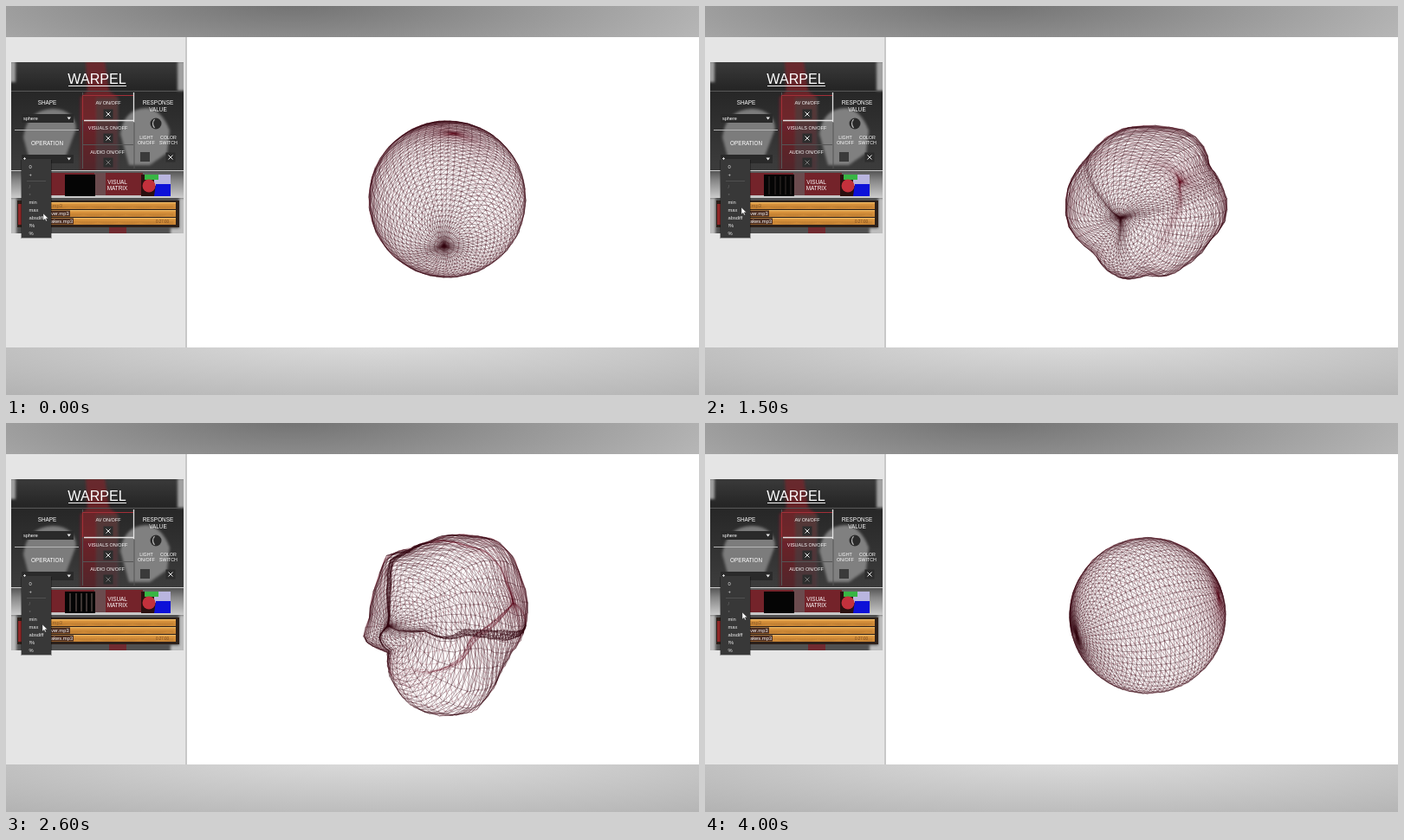
Write an HTML page with a canvas that moves like this. It is 800x450 px and loops after 4100 ms.

```html
<!DOCTYPE html>
<html lang="en">
<head>
<meta charset="utf-8">
<title>Mesh visualiser</title>
<style>
html, body { margin: 0; width: 100%; height: 100%; overflow: hidden; background: #fff; }
#stage { position: relative; width: 800px; height: 450px; overflow: hidden; }
svg, canvas { position: absolute; left: 0; top: 0; display: block; }
text { font-family: "Liberation Sans", Arial, sans-serif; fill: #fff; }
.mid { text-anchor: middle; }
</style>
</head>
<body>
<div id="stage">
<svg id="ui" width="800" height="450" viewBox="0 0 800 450">
  <defs>
    <radialGradient id="top" gradientUnits="userSpaceOnUse" cx="0" cy="0" r="1" gradientTransform="translate(330 -6) scale(520 110)">
      <stop offset="0" stop-color="#707070"/><stop offset="1" stop-color="#b8b8b8"/>
    </radialGradient>
    <radialGradient id="low" gradientUnits="userSpaceOnUse" cx="0" cy="0" r="1" gradientTransform="translate(430 385) scale(720 95)">
      <stop offset="0" stop-color="#dedede"/><stop offset="1" stop-color="#aeaeae"/>
    </radialGradient>
    <linearGradient id="skin" x2="0" y2="1">
      <stop offset="0" stop-color="#3a3a3a"/><stop offset=".15" stop-color="#262626"/>
      <stop offset=".6" stop-color="#3b3b3b"/><stop offset="1" stop-color="#333"/>
    </linearGradient>
    <linearGradient id="steel" x2="0" y2="1">
      <stop offset="0" stop-color="#555"/><stop offset=".35" stop-color="#858585"/><stop offset="1" stop-color="#c8c8c8"/>
    </linearGradient>
    <linearGradient id="robe" x2="0" y2="1">
      <stop offset="0" stop-color="#7c2228"/><stop offset=".5" stop-color="#8a1f28"/><stop offset="1" stop-color="#5a1a1f"/>
    </linearGradient>
    <linearGradient id="amber" x2="0" y2="1">
      <stop offset="0" stop-color="#f4c470"/><stop offset=".25" stop-color="#d8923c"/><stop offset="1" stop-color="#c88434"/>
    </linearGradient>
    <filter id="soft" x="-20%" y="-20%" width="140%" height="140%"><feGaussianBlur stdDeviation="1.6"/></filter>
    <clipPath id="face"><rect x="6" y="65" width="199" height="198"/></clipPath>
  </defs>

  <rect width="800" height="36" fill="url(#top)"/>
  <rect y="395" width="800" height="55" fill="url(#low)"/>
  <rect y="36" width="208" height="359" fill="#e5e5e5"/>
  <rect x="207" y="36" width="2" height="359" fill="#c9c9c9"/>
  <rect x="209" y="36" width="591" height="359" fill="#fff"/>

  <g clip-path="url(#face)">
    <rect x="6" y="65" width="199" height="198" fill="url(#skin)"/>
    <g filter="url(#soft)">
      <path d="M92 64h22l5 34 10 8v86H86v-86l8-8z" fill="url(#robe)" opacity=".7"/>
      <path d="M104 106h26v86h-26z" fill="#444" opacity=".6"/>
      <path d="M20 152q4-32 34-33 26 1 27 23l-12 32H26z" fill="#7c7c7c"/>
      <path d="M132 148q4-29 30-30 18 2 27 26l-3 26-20 14h-24z" fill="#808080"/>
      <path d="M4 64h7v24H4zM198 64h10v34h-10z" fill="#a0a0a0"/>
    </g>
    <rect x="6" y="191" width="199" height="30" fill="url(#steel)"/>
    <rect x="50" y="193" width="108" height="26" fill="#74232a"/>
    <rect x="102" y="193" width="13" height="26" fill="#666" opacity=".6"/>
    <rect x="6" y="222" width="199" height="41" fill="#505050"/>
    <g filter="url(#soft)">
      <path d="M4 222h8v44H4zM200 222h8v44h-8zM190 257h14v8h-14z" fill="#bdbdbd"/>
    </g>
    <rect x="119" y="255" width="20" height="8" fill="#702a30"/>
    <path d="M6 98.500h199" stroke="#585858"/>
    <path d="M88.500 100v88M89 160.500h58M148 135v53" stroke="#555"/>
    <path d="M147 103.500H88.500V132" fill="none" stroke="#a32f38"/>
    <path d="M90 132.500h58M147.500 100v34" stroke="#e4e4e4" stroke-width="1.300"/>
    <path d="M10 143.500h74" stroke="#b5b5b5"/>
    <path d="M6 190.500h199M6 221.500h199" stroke="#ccc"/>
  </g>

  <g fill="#2a2a2a">
    <rect x="18" y="125" width="60" height="10"/>
    <rect x="18" y="172" width="60" height="10"/>
    <rect x="155" y="169" width="11" height="11" fill="#3a3a3a"/>
    <path d="M70.500 128.500h4.500l-2.250 3zM70.500 175.500h4.500l-2.250 3z" fill="#eee"/>
    <circle cx="173" cy="136" r="6.500"/>
    <path d="M171.500 131q-4 5 0 10" fill="none" stroke="#bbb" stroke-width="1.200"/>
  </g>
  <g id="checks"></g>
  <g id="labels"></g>
  <path d="M72 92.500h67" stroke="#f4f4f4"/>

  <rect x="68" y="195" width="35" height="25" fill="#050505"/>
  <path id="bars" d="M74 197v21M81 197v21M87 197v21M93 197v21M99 197v21" stroke="#4c403e" stroke-width="2"/>
  <g>
    <rect x="156" y="195" width="34" height="25" fill="#2a1010"/>
    <rect x="171" y="195" width="19" height="13" fill="#b9b5df"/>
    <rect x="160" y="195" width="16" height="6" fill="#38b544"/>
    <path d="M173 206h17v14h-19z" fill="#0d10d8"/>
    <circle cx="165" cy="208" r="7.500" fill="#c3313c"/>
  </g>

  <rect x="13" y="225" width="187" height="31" fill="#2c201a"/>
  <rect x="14" y="229" width="5" height="24" fill="#8e2828"/>
  <g id="tracks"></g>
  <rect x="17" y="178" width="36" height="91" fill="#000" opacity=".3"/>
  <rect x="18" y="177" width="34" height="91" fill="#383838"/>
  <path d="M24 202.500h22" stroke="#505050"/>
  <path d="M20 176.500h3M21.500 175v3" stroke="#eee" stroke-width=".8"/>
  <g id="menu"></g>
  <path id="cursor" d="M0 0v8l2-1.700 1.200 2.600 1.200-.6-1.200-2.500h2.600z" fill="#fff" stroke="#222" stroke-width=".4"/>
</svg>
<canvas id="mesh" width="800" height="450"></canvas>
</div>
<script>
const LOOP = 4100, STEP = 100, TAU = Math.PI * 2;
const $ = id => document.getElementById(id);
const NS = "http://www.w3.org/2000/svg";

function add(parent, tag, attrs, text) {
  const el = document.createElementNS(NS, tag);
  for (const k in attrs) el.setAttribute(k, attrs[k]);
  if (text) el.textContent = text;
  return $(parent).appendChild(el);
}

[
  ["WARPEL", 105, 89.5, 16.1], ["SHAPE", 47.5, 114.3, 6.4], ["OPERATION", 47.5, 161.3, 6.4],
  ["AV ON/OFF", 118, 113.5, 5.5], ["VISUALS ON/OFF", 117.5, 143, 5.5], ["AUDIO ON/OFF", 117, 170.5, 5.5],
  ["RESPONSE", 175.5, 114.3, 6.4], ["VALUE", 175.5, 121.5, 6.4],
  ["LIGHT", 162, 153.5, 5.3], ["ON/OFF", 162, 159.5, 5.3],
  ["COLOR", 187.5, 153.5, 5.3], ["SWITCH", 187.5, 159.5, 5.3],
  ["VISUAL", 128.5, 205.5, 6.4], ["MATRIX", 128.5, 213, 6.4]
].forEach(([s, x, y, size]) => add("labels", "text", { class: "mid", x, y, "font-size": size }, s));
add("labels", "text", { x: 20, y: 132, "font-size": 5.5 }, "sphere");

[[118, 125, "#eee"], [118, 153, "#eee"], [118, 181, "#777"], [190, 175, "#eee"]].forEach(([x, y, c]) => {
  add("checks", "rect", { x: x - 5.5, y: y - 5.5, width: 11, height: 11, fill: "#2d2d2d" });
  add("checks", "path", { d: `M${x - 2.5} ${y - 2.5}l5 5m0-5l-5 5`, stroke: c, "stroke-width": 1 });
});

["", "ver.mp3", "akes.mp3"].forEach((s, i) => {
  const y = 227 + i * 9;
  add("tracks", "rect", { x: 19, y, width: 177, height: 8, fill: "url(#amber)" });
  let d = "";
  for (let x = 54; x < 194; x += 2) d += `M${x} ${y + 4}v${1 + 2.5 * Math.abs(Math.sin(x * 1.7 + i))}`;
  add("tracks", "path", { d, stroke: "#a96e2c", "stroke-width": 0.8, opacity: 0.6 });
  if (s) {
    add("tracks", "rect", { x: 50, y: y + 0.5, width: i > 1 ? 28 : 24, height: 7, fill: "#4a2c20" });
    add("tracks", "text", { x: 52, y: y + 6, "font-size": 5.8 }, s);
  } else add("tracks", "text", { x: 52, y: y + 6, "font-size": 5.8, style: "fill:#8a5a28" }, ".mp3");
});
add("tracks", "text", { x: 173, y: 251, "font-size": 4.5, style: "fill:#7a4a20" }, "0:27:00");

[["0", 188], ["+", 197], ["/", 211], ["*", 221], ["min", 229], ["max", 238], ["absdiff", 247], ["!%", 256], ["%", 265]]
  .forEach(([s, y]) => add("menu", "text", {
    x: 26.5, y, "font-size": 5.8, opacity: s === "/" || s === "*" ? 0.3 : 0.9
  }, s));

// Outline radii, one every 15 degrees clockwise from the right.
const round = r => Array(24).fill(r);
const lobes = [99, 100, 101, 95, 92, 91, 95, 86, 94, 93, 95, 98, 83, 97, 99, 91, 90, 95, 106, 96, 87, 115, 114, 93];
const star = [98, 97, 83, 83, 83, 88, 79, 95, 92, 79, 90, 100, 96, 93, 84, 82, 86, 89, 87, 91, 102, 97, 79, 88];
const shell = [91, 89, 84, 87, 100, 113, 114, 113, 106, 95, 80, 101, 91, 90, 92, 101, 91, 90, 95, 98, 105, 104, 97, 95];
const bulge = [90, 89, 87, 88, 94, 95, 94, 90, 86, 86, 95, 92, 90, 92, 92, 89, 90, 94, 96, 96, 92, 89, 90, 90];

// v: axis x, axis y, bow x, bow y, centre x, centre y, fold
const keys = [
  { t: 0, v: [-0.06, 0.72, 0.04, -0.25, 509.5, 223.5, 0.1], r: round(90.5) },
  { t: 500, v: [-0.05, 0.68, -0.1, -0.3, 510, 225, 1], r: lobes },
  { t: 1000, v: [-0.27, 0.38, 0.08, -0.05, 510, 225, 0.85], r: star },
  { t: 2000, v: [-0.52, 0.1, 0.08, -0.05, 508.5, 229.5, 0.04], r: round(89.5) },
  { t: 2600, v: [-0.76, 0.14, 0.1, -0.1, 510, 225, 0.9], r: shell },
  { t: 3100, v: [-0.83, 0.12, 0.05, -0.05, 510, 225, 0.35], r: bulge },
  { t: 4000, v: [-0.91, 0.25, 0, 0, 511, 222.8, 0], r: round(90) }
];
const lerp = (a, b, k) => a + (b - a) * k;
const mix = (a, b, k) => a.map((x, i) => lerp(x, b[i], k));
const noise = n => (Math.sin(n * 12.9898) * 43758.5453 % 1 + 1) % 1 - 0.5;

function pose(t) {
  let i = 0;
  while (i < keys.length - 2 && t >= keys[i + 1].t) i++;
  const a = keys[i], b = keys[i + 1], k = Math.min(1, (t - a.t) / (b.t - a.t));
  return { v: mix(a.v, b.v, k), r: mix(a.r, b.r, k) };
}

const ctx = $("mesh").getContext("2d");
const ROWS = 50, COLS = 54;

function vertices(t) {
  const { v: [px, py, bx, by, cx, cy, fold], r } = pose(t);
  const flat = Math.hypot(px, py), pz = Math.sqrt(1 - flat * flat);
  const ux = py / flat, uy = -px / flat;
  const wx = -pz * uy, wy = pz * ux, wz = px * uy - py * ux;
  const grid = [];
  for (let j = 0; j <= COLS; j++) {
    const base = j / COLS * TAU, spin = base + t * 0.0002;
    // A strong twist lets neighbouring lobes overlap in dark bands.
    const twist = fold * 0.52 * Math.sin(3 * base + 1.87);
    const crease = (1 - Math.abs(Math.sin(2.5 * base))) ** 2;
    const line = [];
    for (let i = 0; i <= ROWS; i++) {
      const lat = i / ROWS * Math.PI, s = Math.sin(lat), c = Math.cos(lat);
      const lon = spin + twist * (0.7 + 0.3 * Math.cos(2 * lat + base * 2));
      const a = s * Math.cos(lon), b = s * Math.sin(lon);
      let x = c * px + a * ux + b * wx, y = c * py + a * uy + b * wy;
      const z = c * pz + b * wz;
      const dent = 1 - fold * 0.25 * crease * s * Math.abs(z);
      const bow = Math.max(0, 1 - x * x - y * y);
      x = x * dent + bx * bow;
      y = y * dent + by * bow;
      const q = (Math.atan2(y, x) / TAU + 1) % 1 * 24, n = Math.floor(q) % 24;
      const size = lerp(r[n], r[(n + 1) % 24], q - Math.floor(q));
      const id = (j % COLS) * 61 + i, shake = (1 + fold) * s;
      line.push([cx + x * size + shake * noise(id), cy + y * size + shake * noise(id + 7000), z]);
    }
    grid.push(line);
  }
  return { grid, fold };
}

function seg(a, b) {
  ctx.moveTo(a[0], a[1]);
  ctx.lineTo(b[0], b[1]);
}

function drawMesh(t) {
  const { grid, fold } = vertices(t);
  ctx.clearRect(0, 0, 800, 450);
  for (const front of [false, true]) {
    ctx.strokeStyle = front ? "rgba(52,8,18,.68)" : "rgba(115,28,46,.4)";
    ctx.lineWidth = 0.55;
    for (let j = 0; j < COLS; j++) {
      ctx.beginPath();
      for (let i = 0; i < ROWS; i++) {
        const p = grid[j][i];
        if (p[2] > 0 !== front) continue;
        seg(p, grid[j][i + 1]);
        seg(p, grid[j + 1][i]);
        seg(p, grid[j + 1][i + 1]);
      }
      ctx.stroke();
    }
  }
  return fold;
}

function cursorAt(t) {
  if (t < 500) return [lerp(43, 42, t / 500), lerp(240, 233, t / 500)];
  const k = Math.max(0, Math.min(1, (t - 3100) / 900));
  return [lerp(42, 43, k), lerp(233, 219, k)];
}

function render(t) {
  const fold = drawMesh(t);
  $("bars").setAttribute("opacity", t > 800 && t < 1300 ? 0 : Math.max(0, fold - 0.1));
  $("cursor").setAttribute("transform", `translate(${cursorAt(t)})`);
}

let last = -1;
const start = performance.now();
function tick() {
  const t = Math.floor((performance.now() - start) % LOOP / STEP) * STEP;
  if (t !== last) render(last = t);
  requestAnimationFrame(tick);
}
render(0);
requestAnimationFrame(tick);
</script>
</body>
</html>
```
